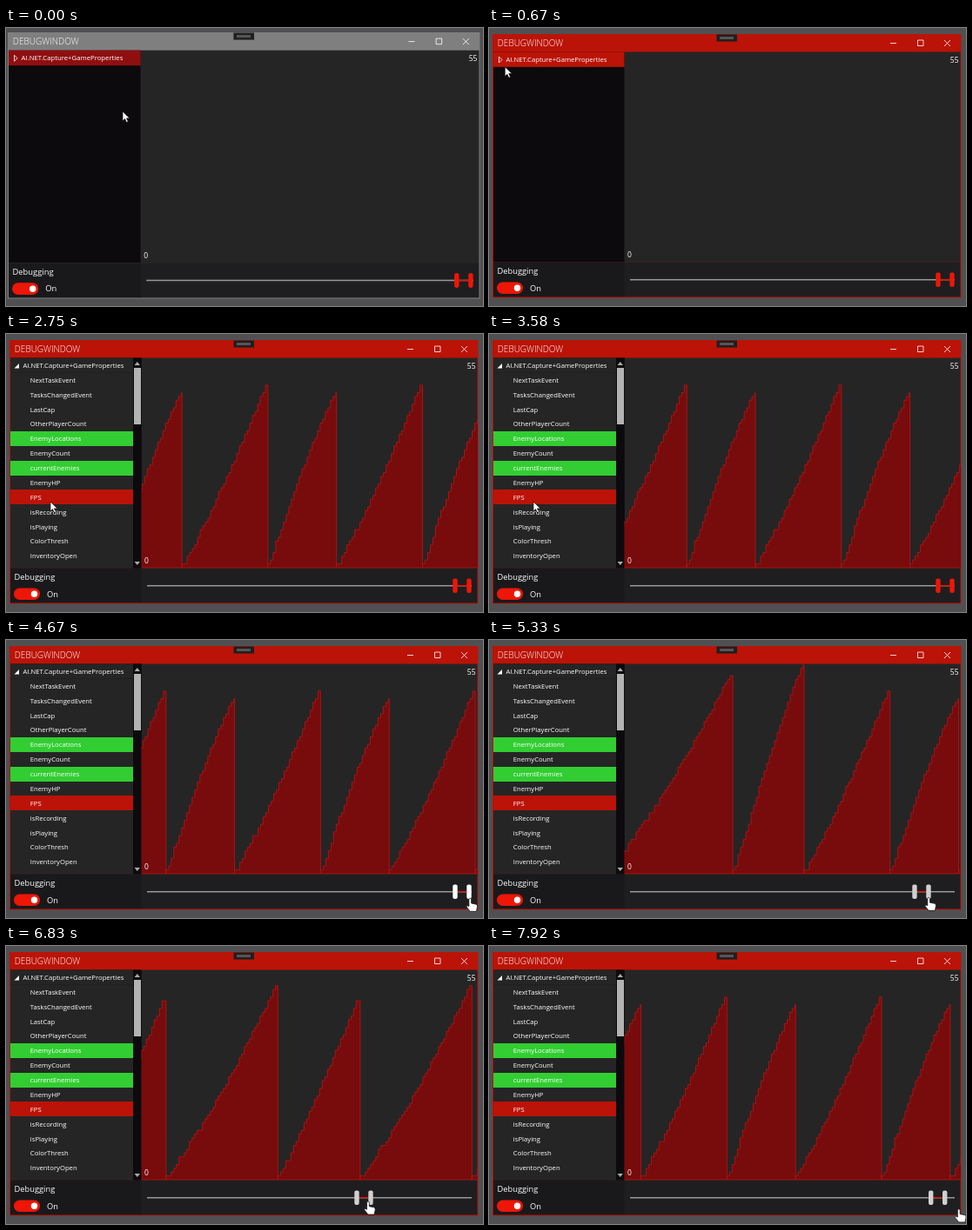
Write an HTML page that moves like this. It is 548 px wide and 320 px high and loops after 8000 ms.

```html
<!DOCTYPE html>
<html lang="en">
<head>
<meta charset="utf-8">
<title>Debug window</title>
<style>
  html, body { margin: 0; width: 100%; height: 100%; overflow: hidden; background: #505052; }
  svg { display: block; width: 548px; height: 320px; }
  text { font: 500 7.7px "Open Sans", "Noto Sans", sans-serif; fill: #fff; }
  .title { font-size: 10px; font-weight: 300; }
  .label { font-size: 9.3px; font-weight: 400; }
  .scale { font-size: 8.5px; font-weight: 400; }
</style>
</head>
<body>
<svg viewBox="0 0 548 320">
  <defs><clipPath id="chartClip"><rect x="155.5" y="28" width="386.5" height="241.5"/></clipPath></defs>
  <g id="win">
    <rect id="frame" x="4" y="7" width="538.5" height="303.5"/>
    <rect x="5" y="27.5" width="151" height="242" fill="#0c0a0d"/>
    <rect x="155.5" y="27.5" width="386" height="242" fill="#252526"/>
    <rect x="5" y="269.5" width="151" height="40" fill="#19191b"/>
    <rect x="155.5" y="269.5" width="386" height="40" fill="#1e1e20"/>
    <rect x="261.5" y="7.5" width="23.5" height="8" fill="#1f1f20"/>
    <rect x="265" y="10" width="16" height="3" fill="#555"/>
    <text class="title" x="9.8" y="21.3">DEBUGWINDOW</text>
    <path d="M461 17.5h7M492.5 14h6.5v6.5h-6.5zM523 14l7 7m0-7l-7 7" fill="none" stroke="#fff" stroke-width=".8"/>

    <rect id="rootRow" x="5" y="27.5" height="17.3"/>
    <path id="closedArrow" d="M11.5 33l3.5 3.5-3.5 3.5z" fill="none" stroke="#fff" stroke-width=".8"/>
    <g id="tree"></g>
    <text x="19.5" y="39">AI.NET.Capture+GameProperties</text>
    <g id="scrollbar">
      <rect x="146" y="27.5" width="9.5" height="242" fill="#0c0a0d"/>
      <rect x="147" y="39" width="8" height="65" fill="#b3b3b3"/>
      <path d="M147.5 36h6.5l-3.2-4zM147.5 262h6.5l-3.2 4z" fill="#aaa"/>
    </g>

    <path id="graph" clip-path="url(#chartClip)" fill="#780b0c" stroke="#a81413"/>
    <text class="scale" x="159" y="264">0</text>
    <text class="scale" x="539.5" y="39.5" text-anchor="end">55</text>

    <text class="label" x="9.5" y="283">Debugging</text>
    <rect x="9" y="292.5" width="30" height="13.5" rx="6.7" fill="#ed1607"/>
    <circle cx="32.5" cy="299.3" r="3.7" fill="#fff"/>
    <text class="label" x="47" y="302.5">On</text>

    <path d="M162 289.7H535" stroke="#989898" stroke-width="1.5"/>
    <g id="range">
      <path d="M-16 289.7H0" stroke="#d51509" stroke-width="1.5"/>
      <g id="thumbs">
        <rect x="-18.7" y="281.5" width="5.4" height="16.5" rx="2"/>
        <rect x="-2.7" y="281.5" width="5.4" height="16.5" rx="2"/>
      </g>
    </g>
  </g>
  <g id="cursor" fill="#fff" stroke="#111" stroke-width=".7">
    <path id="pointer" d="M0 0v11l2.6-2.4 1.8 4 1.9-.9-1.8-3.8h3.6z"/>
    <path id="hand" transform="scale(1.1)" d="M-1.5 1q1.4-1.5 2.5 0v4.5l5 1q1.5.5 1.3 2.5l-1 5h-6.500l-4-5q.5-1.800 2.700-.3z"/>
  </g>
</svg>
<script>
const el = id => document.getElementById(id);
const LOOP = 8000, ACTIVATE = 250, EXPAND = 830, SELECT = 2500, HOVER = 4070, GRAB = 5000;
const RED = '#bb1307', GREEN = '#32cd32', PANEL = '#252526';

const properties = ['NextTaskEvent', 'TasksChangedEvent', 'LastCap', 'OtherPlayerCount',
  'EnemyLocations', 'EnemyCount', 'currentEnemies', 'EnemyHP', 'FPS', 'isRecording',
  'isPlaying', 'ColorThresh', 'InventoryOpen'];
const updated = ['EnemyLocations', 'currentEnemies', 'FPS'];

el('tree').innerHTML = `<rect x="5" y="44.8" width="141" height="224.7" fill="${PANEL}"/>` +
  '<path id="openArrow" d="M9.5 39.5h5.5v-5.5z"/>' +
  properties.map((name, i) => {
    const y = 27.6 + 16.87 * (i + 1);
    const fill = updated.includes(name) ? GREEN : 'none';
    return `<rect id="row-${name}" x="5" y="${y}" width="141" height="17" fill="${fill}" ` +
      `shape-rendering="crispEdges"/><text x="27.8" y="${y + 11.4}">${name}</text>`;
  }).join('');

const smooth = u => u * u * (3 - 2 * u);
const easeOut = u => Math.sin(u * Math.PI / 2);
const clamp = (v, low, high) => Math.min(high, Math.max(low, v));

// Each move carries the named values from wherever they are to new ones.
const initial = { x: 134, y: 96, thumb: 532, offset: 43 };
const moves = [
  { from: ACTIVATE, to: 750, x: 10, y: 41 },
  { from: 1620, to: 2380, x: 51, y: 193 },
  { from: 3620, to: 4150, x: 533.5, y: 297 },
  { from: GRAB, to: 7250, ease: easeOut, x: 411, y: 293.5, thumb: 414, offset: -2717 },
  { from: 7380, to: 7920, x: 540, y: 302.5, thumb: 523.7, offset: 131 }
];
function stateAt(t) {
  const state = { ...initial };
  for (const { from, to, ease = smooth, ...goal } of moves) {
    const u = ease(clamp((t - from) / (to - from), 0, 1));
    for (const key in goal) state[key] += (goal[key] - state[key]) * u;
  }
  return state;
}

// One tooth is one second of counting; long and short teeth alternate.
const TOOTH = 88.8;
const runs = [
  { start: -2795, width: 111.5, sway: 17 },
  { start: -1857, width: 156, sway: -12 },
  { start: -28 - 4 * TOOTH, width: TOOTH, sway: 10 }
];
const teeth = [];
runs.forEach(({ start, width, sway }, r) => {
  const stop = r + 1 < runs.length ? runs[r + 1].start : 620;
  for (let i = 0; start < stop; i++) {
    const length = width + (i % 2 ? -sway : sway);
    teeth.push({ start, end: Math.min(start + length, stop), peak: 38 + length / 10 });
    start += length;
  }
});

const hash = n => { const v = Math.sin(n * 12.9898) * 43758.5453; return v - Math.floor(v); };

function graphPath(offset) {
  const left = 156, bottom = 269, unit = 4.38, step = 3;
  const toX = d => (d + left - offset).toFixed(1);
  let path = '';
  for (const { start, end, peak } of teeth) {
    if (end < offset - 5 || start > offset + 392) continue;
    const length = end - start;
    const bend = clamp((90 - length) * .004, -.05, .05);
    path += `M${toX(start)} ${bottom}`;
    for (let d = 0; d < length; d += step) {
      const u = Math.min(1, d / (length - step));
      const wobble = bend * Math.sin(Math.PI * u) + .02 * (hash(start + d) - .5) * (1 - u);
      const value = Math.max(1, Math.round(peak * (u + wobble)));
      path += `V${(bottom - value * unit).toFixed(1)}H${toX(start + Math.min(d + step, length))}`;
    }
    path += `V${bottom}z`;
  }
  return path;
}

const show = (id, on) => el(id).style.display = on ? '' : 'none';
const paint = (id, color) => el(id).setAttribute('fill', color);
const place = (id, x, y) => el(id).setAttribute('transform', `translate(${x} ${y})`);

function render(t) {
  const active = t >= ACTIVATE, expanded = t >= EXPAND, selected = t >= SELECT, hover = t >= HOVER;
  el('win').setAttribute('transform', active ? '' : 'matrix(1.0074 0 0 1.0099 -2.03 -2.07)');
  paint('frame', active ? RED : '#7f7f80');

  paint('rootRow', selected ? PANEL : active ? RED : '#8f0f11');
  el('rootRow').setAttribute('width', expanded ? 141 : 150.5);
  show('closedArrow', !expanded);
  show('tree', expanded);
  show('scrollbar', expanded);
  paint('openArrow', selected ? '#fff' : '#e0291c');
  paint('row-FPS', selected ? RED : GREEN);

  const { x, y, thumb, offset } = stateAt(t);
  // The graph runs live until the slider is touched.
  const pending = Math.max(0, HOVER - t) / 1000 * TOOTH;
  el('graph').setAttribute('d', selected ? graphPath(offset - pending) : '');
  place('range', thumb, 0);
  paint('thumbs', !hover ? '#ed1607' : t < GRAB ? '#fff' : '#d0d0d0');

  place('cursor', x, y);
  show('pointer', !hover);
  show('hand', hover);
}

const began = performance.now();
function tick() {
  render((performance.now() - began) % LOOP);
  requestAnimationFrame(tick);
}
tick();
</script>
</body>
</html>
```
